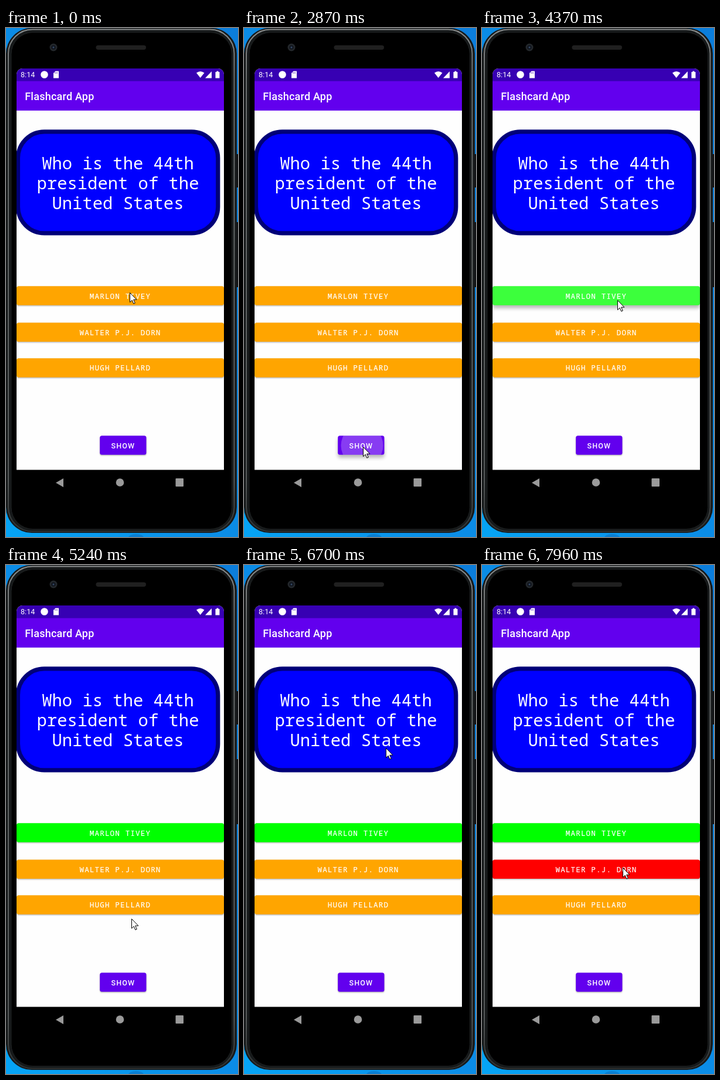
These frames come from a looping animation (396 by 868 pixels, 8 s). An HTML page:

```html
<!DOCTYPE html>
<html lang="en">
<head>
<meta charset="utf-8">
<title>Flashcard App</title>
<style>
  html, body { margin: 0; width: 100%; height: 100%; overflow: hidden; background: #0c8be6; }
  svg { display: block; width: 396px; height: 868px; }
  text { fill: #fff; white-space: pre; }
  .ui { font-family: Roboto, sans-serif; }
  .title { font-size: 18.03px; font-weight: 500; letter-spacing: .225px; }
  .mono { font-family: "Noto Sans Mono", "DejaVu Sans Mono", monospace; text-anchor: middle; }
  .label { font-size: 12.62px; letter-spacing: 1.127px; stroke: #fff; stroke-width: .2px; }
  .cap { font: 500 12.62px Roboto, sans-serif; letter-spacing: 1.127px; text-anchor: middle; }
</style>
</head>
<body>
<svg viewBox="0 0 396 868" xmlns="http://www.w3.org/2000/svg">
  <defs>
    <linearGradient id="sky" x1="1" x2="0" y2="1">
      <stop offset="0" stop-color="#0b7ddb"/>
      <stop offset=".5" stop-color="#0b8ce6"/>
      <stop offset="1" stop-color="#06a4f5"/>
    </linearGradient>
    <linearGradient id="rim" x2="0" y2="1">
      <stop offset="0" stop-color="#8a8d8d"/>
      <stop offset=".1" stop-color="#6a6e6e"/>
      <stop offset=".9" stop-color="#565a5a"/>
      <stop offset="1" stop-color="#2e3131"/>
    </linearGradient>
    <clipPath id="screen"><path d="M18 753.6V79a10 10 0 0 1 10-10H362a10 10 0 0 1 10 10V753.6Z"/></clipPath>
    <filter id="near" x="-10%" y="-50%" width="120%" height="200%"><feGaussianBlur stdDeviation="1"/></filter>
    <filter id="far" x="-20%" y="-80%" width="140%" height="260%"><feGaussianBlur stdDeviation="3"/></filter>
  </defs>

  <rect width="396" height="868" fill="url(#sky)"/>
  <ellipse cx="222" cy="869" rx="13" ry="6" fill="#0a7fd2"/>

  <!-- phone body -->
  <rect x="391" y="215" width="5" height="57" fill="#101214"/>
  <rect x="391" y="331" width="5" height="111" fill="#101214"/>
  <rect x="0" y="0" width="394" height="861" rx="44" fill="#16191a"/>
  <rect x="4" y="2.5" width="385.5" height="856" rx="41" fill="none" stroke="url(#rim)" stroke-width="2"/>
  <rect x="9" y="7.5" width="376.5" height="847" rx="37" fill="#000" stroke="#1d2021"/>
  <circle cx="81" cy="33" r="6.5" fill="#24282c"/>
  <circle cx="81" cy="33" r="3.8" fill="#11161e"/>
  <circle cx="81" cy="33" r="1.5" fill="#344866"/>
  <rect x="153.5" y="29.5" width="85.5" height="7.5" rx="3.7" fill="#202020"/>

  <g clip-path="url(#screen)">
    <rect x="18" y="69" width="354" height="685" fill="#fefefe"/>
    <rect x="18" y="90" width="354" height="50.8" fill="#6200ee"/>
    <rect x="18" y="69" width="354" height="21.6" fill="#3700b3"/>
    <text class="ui" x="25" y="84" font-size="12.6">8:14</text>
    <g fill="#fff">
      <circle cx="65.5" cy="79.5" r="6.3"/>
      <path d="M81 77l3.5-3.5H90V85.5H81Z"/>
      <path d="M325 76.500Q331.700 71.500 338.500 76.500L331.700 85Z"/>
      <path d="M340 85.500L351 74V85.500Z"/>
      <path d="M357.500 75H359.500V73.500H362.500V75H364.500V85.500H357.500Z"/>
    </g>
    <path d="M83.500 75.500v2M85.500 75.500v2M87.500 75.500v2" stroke="#3700b3" stroke-width=".8"/>
    <text class="ui title" x="32.2" y="123">Flashcard App</text>

    <rect x="20.4" y="176.8" width="341.4" height="173.1" rx="45" fill="#00f" stroke="#000078" stroke-width="7.2"/>
    <g class="mono" font-size="28.85">
      <text x="191" y="241">Who is the 44th</text>
      <text x="191" y="275">president of the</text>
      <text x="191" y="308.5">United States</text>
    </g>
    <g id="answers"></g>
    <g id="footer"></g>
  </g>

  <g fill="#9a9a9a">
    <path d="M85 775.500L98 768V783Z"/>
    <circle cx="194.5" cy="775" r="6.8"/>
    <rect x="289.5" y="768" width="13.5" height="14" rx="1"/>
  </g>
  <path id="cursor" d="M0 0V16.200L3.700 12.700L6.300 18.700L8.800 17.600L6.200 11.700H11.400Z" fill="#fff" stroke="#000"/>
</svg>

<script>
const LOOP = 8000;
const NS = 'http://www.w3.org/2000/svg';
const $ = id => document.getElementById(id);

// Screen refreshes: [first, last, count], evenly spaced
const refreshes = [
  [0, 0, 1], [940, 1780, 7], [1900, 2020, 2], [2450, 2870, 4], [3020, 3470, 4],
  [3590, 4370, 7], [4520, 5630, 9], [5760, 6180, 4], [6430, 6700, 3],
  [6850, 7840, 8], [7960, 7960, 1]
].flatMap(([a, b, n]) =>
  Array.from({ length: n }, (_, i) => n > 1 ? a + (b - a) * i / (n - 1) : a));

// Pointer path: [time, x, y]
const path = [
  [0, 211, 451], [830, 211, 451], [1380, 203, 714], [3020, 203, 714],
  [3470, 206, 592], [4060, 231, 464], [4520, 231, 464], [4640, 230, 455],
  [5630, 204, 695], [6180, 240, 522], [6300, 240, 522], [6700, 242, 312],
  [6990, 241, 283], [7420, 238, 540], [7550, 240, 516]
];

function el(parent, tag, attrs, text) {
  const node = document.createElementNS(NS, tag);
  for (const key in attrs) node.setAttribute(key, attrs[key]);
  if (text) node.textContent = text;
  return parent.appendChild(node);
}

function button(parent, id, x, y, width, label, cls, base, fill) {
  const box = { x, y, width, height: 32.5, rx: 3.6 };
  el(el(parent, 'clipPath', { id }), 'rect', box);
  const shade = el(parent, 'rect', { ...box, fill: '#000' });
  const face = el(parent, 'rect', { ...box, fill });
  const ripple = el(parent, 'circle', { fill: '#fff', 'fill-opacity': .235, 'clip-path': `url(#${id})` });
  el(parent, 'text', { class: cls, x: x + width / 2, y: base }, label);
  return { shade, face, ripple };
}

const answer = (id, y, base, label) =>
  button($('answers'), id, 18, y, 354, label, 'mono label', base, '#ffa500');
const first = answer('first', 440.3, 461.5, 'MARLON TIVEY');
const second = answer('second', 502.5, 523.5, 'WALTER P.J. DORN');
const third = answer('third', 563.2, 584, 'HUGH PELLARD');
const show = button($('footer'), 'show', 160.2, 695.3, 79.3, 'SHOW', 'cap', 716.6, '#6200ee');

// Touches: raised between down and up, ripple gone at end
const touches = [
  { on: show, down: 1400, up: 1850, end: 2000, x: 201.5, y: 712, reach: 38.3 },
  { on: show, down: 2560, up: 2950, end: 3100, x: 201.5, y: 712, reach: 38.3 },
  { on: first, down: 4060, up: 4450, end: 4500, x: 231, y: 464, reach: 300 },
  { on: second, down: 7500, up: 7800, end: 7900, x: 240, y: 516, reach: 300 }
];

function pointerAt(t) {
  const i = path.findIndex(p => p[0] > t);
  if (i < 0) return path[path.length - 1].slice(1);
  const [a, b] = [path[i - 1], path[i]];
  const u = (t - a[0]) / (b[0] - a[0]);
  const e = u * u * (3 - 2 * u);
  return [a[1] + (b[1] - a[1]) * e, a[2] + (b[2] - a[2]) * e];
}

function paintTouch(btn, t) {
  const touch = touches.find(p => p.on === btn && t >= p.down && t < p.end);
  const raised = touch && t < touch.up;
  btn.shade.setAttribute('transform', `translate(0 ${raised ? 5 : 1.2})`);
  btn.shade.setAttribute('filter', `url(#${raised ? 'far' : 'near'})`);
  btn.shade.setAttribute('opacity', raised ? .28 : .3);
  btn.ripple.setAttribute('r', touch ? touch.reach * (t - touch.down) / 330 : 0);
  if (touch) {
    btn.ripple.setAttribute('cx', touch.x);
    btn.ripple.setAttribute('cy', touch.y);
  }
}

function draw(time) {
  const t = refreshes.filter(r => r <= time + .01).pop();
  $('answers').style.display = t >= 1600 && t < 2700 ? 'none' : '';
  first.face.setAttribute('fill', t >= 4230 ? '#0f0' : '#ffa500');
  second.face.setAttribute('fill', t >= 7690 ? '#f00' : '#ffa500');
  [first, second, third, show].forEach(btn => paintTouch(btn, t));
  const [x, y] = pointerAt(t);
  $('cursor').setAttribute('transform', `translate(${Math.round(x) + .5} ${Math.round(y) + .5})`);
}

const start = performance.now();
function tick() {
  draw((performance.now() - start) % LOOP);
  requestAnimationFrame(tick);
}
tick();
</script>
</body>
</html>
```
